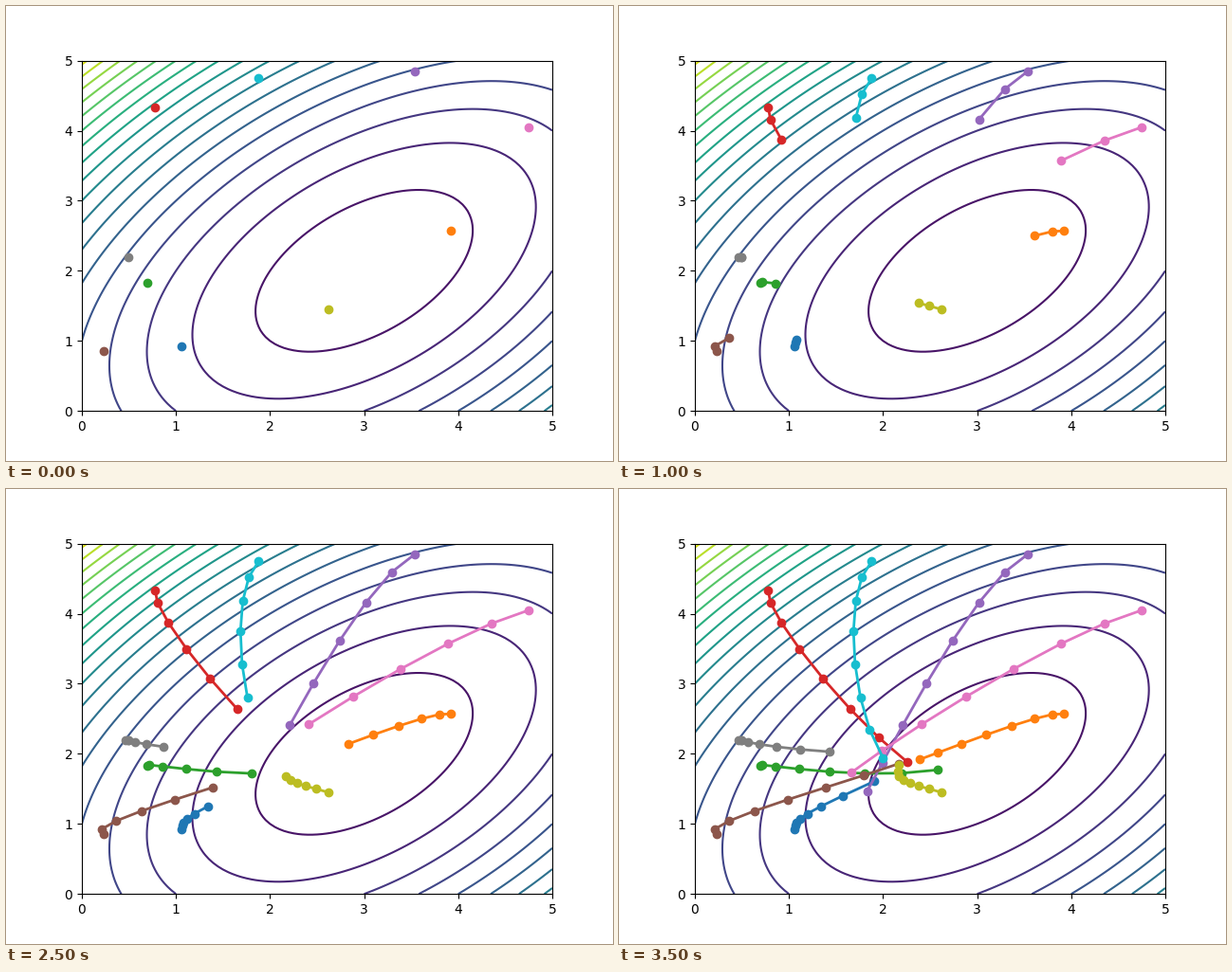
Write a matplotlib script that moves like this. It is 640 by 480 pixels and loops after 4000 ms.

```python
import numpy as np
import matplotlib.pyplot as plt
from matplotlib.animation import FuncAnimation

FRAMES, INTERVAL = 8, 500

# Each particle glides on a cubic curve through its places at these steps.
KEY_STEPS = [0, 2, 5, 7]
KEY_POINTS = {
    "tab:blue": [(1.06, 0.92), (1.08, 1.02), (1.34, 1.25), (1.91, 1.61)],
    "tab:orange": [(3.92, 2.57), (3.61, 2.50), (2.83, 2.14), (2.39, 1.92)],
    "tab:green": [(0.70, 1.83), (0.86, 1.82), (1.80, 1.72), (2.58, 1.77)],
    "tab:red": [(0.78, 4.33), (0.92, 3.87), (1.65, 2.64), (2.26, 1.88)],
    "tab:purple": [(3.54, 4.85), (3.02, 4.16), (2.21, 2.41), (1.83, 1.46)],
    "tab:brown": [(0.23, 0.85), (0.36, 1.04), (1.39, 1.52), (2.17, 1.86)],
    "tab:pink": [(4.75, 4.05), (3.89, 3.57), (2.41, 2.42), (1.66, 1.73)],
    "tab:gray": [(0.49, 2.19), (0.49, 2.19), (0.87, 2.10), (1.43, 2.03)],
    "tab:olive": [(2.62, 1.45), (2.38, 1.54), (2.17, 1.68), (2.17, 1.84)],
    "tab:cyan": [(1.88, 4.75), (1.71, 4.18), (1.76, 2.80), (2.00, 1.94)],
}


def cost(x, y):
    return x**2 + y**2 - x * y - 4 * x - y


def glide(points):
    """Positions at every step on the cubic through the key points."""
    return np.vander(np.arange(FRAMES), 4) @ np.polyfit(KEY_STEPS, points, 3)


fig, ax = plt.subplots(figsize=(6.4, 4.8), dpi=100)
x, y = np.meshgrid(np.linspace(0, 5, 101), np.linspace(0, 5, 101))
ax.contour(x, y, cost(x, y), 20)
ax.set(xlim=(0, 5), ylim=(0, 5))

paths = [glide(points) for points in KEY_POINTS.values()]
trails = [ax.plot([], [], "o-", color=color, linewidth=2)[0]
          for color in KEY_POINTS]


def update(frame):
    for trail, path in zip(trails, paths):
        trail.set_data(*path[:frame + 1].T)
    return trails


anim = FuncAnimation(fig, update, frames=FRAMES, interval=INTERVAL,
                     repeat=True, repeat_delay=0)
plt.show()
```
